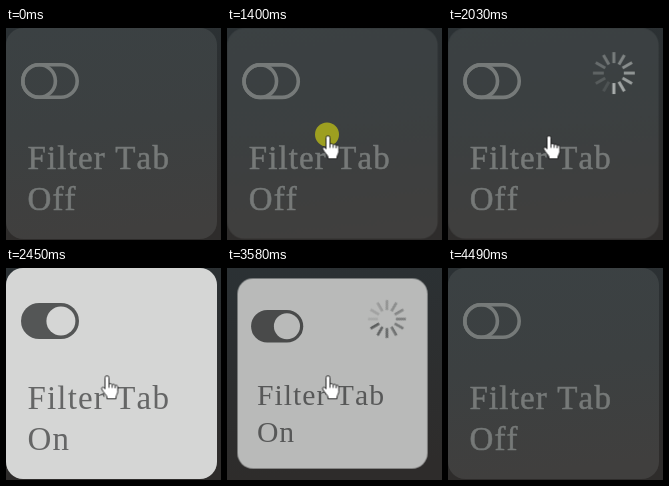
An HTML page that plays this animation: 215 px wide and 212 px high, repeating every 5280 ms.

```html
<!DOCTYPE html>
<html lang="en">
<head>
<meta charset="utf-8">
<title>Filter Tab toggle</title>
<style>
  html, body { margin: 0; width: 100%; height: 100%; overflow: hidden; background: #2c2f31; }
  svg { display: block; width: 215px; height: 212px; }
  text {
    font: 33px "Liberation Serif", "Times New Roman", serif;
    font-kerning: none;
    letter-spacing: 1.15px;
  }

  .tile, .dark, .light, .lit, .shade, .wait-dark, .wait-light, .click, .hand {
    animation: 5280ms step-end infinite;
  }
  .tile {
    transform-origin: 105.5px 105.5px;
    animation-name: bounce;
    animation-timing-function: cubic-bezier(.2, .8, .4, 1);
  }
  .dark { animation-name: dark; fill: #767978; stroke: #767a79; }
  .dark text { stroke-width: .5; }
  .light { animation-name: light; fill: #545656; }
  .light text { fill: #656666; }
  .lit { animation-name: lit; }
  .shade { animation-name: shade; animation-timing-function: linear; }
  .wait-dark { animation-name: wait-dark; stroke: #abafae; }
  .wait-light { animation-name: wait-light; stroke: #5c5e5e; }
  .spin { animation: spin 1320ms steps(12) infinite; }
  .click { animation-name: click; }
  .hand { animation-name: hand; }

  /* two presses, each a one-second bounce */
  @keyframes bounce {
    0%, 26.515%, 45.455%, 65.15%, 84.091%, 100% { transform: scale(1); }
    29.356%, 67.992% { transform: scale(.9); }
    31.25%, 69.886% { transform: scale(1); }
    32.197%, 70.833% { transform: scale(.98); }
  }
  @keyframes dark {
    0%, 77.083%, 100% { opacity: 1; }
    39.77% { opacity: 0; }
  }
  @keyframes light {
    0%, 77.083%, 100% { opacity: 0; }
    39.77% { opacity: 1; }
  }
  @keyframes lit {
    0%, 77.083%, 100% { opacity: 0; }
    39.77% { opacity: .7; }
    41.09% { opacity: 1; }
  }
  @keyframes shade {
    0%, 65.15%, 75.75%, 100% { opacity: 0; }
    67.8% { opacity: .13; }
  }
  @keyframes wait-dark {
    0%, 39.77%, 100% { opacity: 0; }
    27.84% { opacity: 1; }
  }
  @keyframes wait-light {
    0%, 77.083%, 100% { opacity: 0; }
    66.47% { opacity: 1; }
  }
  @keyframes spin { to { transform: rotate(360deg); } }
  @keyframes click {
    0%, 29.16%, 67.8%, 100% { opacity: 0; }
    26.515%, 65.15% { opacity: .5; }
  }
  @keyframes hand {
    0%, 85.03%, 100% { transform: translate(230px, 230px); }
    4.924% { transform: translate(157px, 186px); }
    6.25% { transform: translate(134px, 158px); }
    7.575% { transform: translate(112px, 130px); }
    8.9% { transform: translate(103px, 118px); }
    15.15% { transform: translate(100px, 114px); }
    16.477% { transform: translate(96px, 109px); }
    17.803% { transform: translate(94.5px, 107.3px); }
    82.386% { transform: translate(122px, 122px); }
    83.712% { transform: translate(176px, 146px); }
  }
</style>
</head>
<body>
<svg viewBox="0 0 215 212">
  <defs>
    <linearGradient id="wall" x2=".1" y2="1">
      <stop stop-color="#2b3134"/>
      <stop offset="1" stop-color="#2e2c2b"/>
    </linearGradient>
    <linearGradient id="glass" x2=".1" y2="1">
      <stop stop-color="#3b4143"/>
      <stop offset=".5" stop-color="#3c4041"/>
      <stop offset="1" stop-color="#403f3e"/>
    </linearGradient>
    <rect id="card" width="211" height="211" rx="17"/>
    <g id="bars" stroke-width="3"></g>
  </defs>

  <rect width="215" height="212" fill="url(#wall)"/>

  <g class="tile">
    <use href="#card" fill="url(#glass)"/>
    <use href="#card" class="lit" fill="#d5d6d5"/>

    <g class="dark">
      <g fill="none" stroke-width="3.6">
        <rect x="16.8" y="36.7" width="54.4" height="32.6" rx="16.3"/>
        <circle cx="33.1" cy="53" r="16.3"/>
      </g>
      <text x="21.5" y="141">Filter Tab</text>
      <text x="21.5" y="182">Off</text>
    </g>

    <g class="light">
      <rect x="15" y="34.9" width="58" height="36.2" rx="18.1"/>
      <circle cx="54.9" cy="53" r="14.5" fill="#d5d6d5"/>
      <text x="21.5" y="141">Filter Tab</text>
      <text x="21.5" y="182">On</text>
    </g>

    <use href="#card" class="shade"/>

    <g transform="translate(166 45)">
      <g class="wait-dark"><use href="#bars" class="spin"/></g>
      <g class="wait-light"><use href="#bars" class="spin"/></g>
    </g>
  </g>

  <circle class="click" cx="100" cy="106.5" r="12" fill="#ff0"/>

  <g class="hand" fill="#fff" stroke="#111" stroke-width=".9" stroke-linejoin="round">
    <path d="M4.5 2.5a2 2 0 0 1 4 0v6.5a1.9 1.9 0 0 1 3.2.6a1.8 1.8 0 0 1 3 .8a1.6 1.6 0 0 1 2.6 1.4v4.7c0 2-1.8 3.5-1.8 5.5v1.5h-9v-1.5c0-2-3.5-4.5-5.2-8c-.8-1.8 1.4-2.8 2.6-1.2l.6.8z"/>
    <path d="M8.5 9v3.5M11.7 9.6v3M14.7 10.4v2.6"/>
  </g>
</svg>
<script>
  // Twelve spokes fading back from the leading one.
  const bars = document.getElementById("bars");
  for (let i = 0; i < 12; i++) {
    const bar = document.createElementNS("http://www.w3.org/2000/svg", "path");
    bar.setAttribute("d", "M0-10V-21");
    bar.setAttribute("transform", `rotate(${-30 * i})`);
    bar.setAttribute("opacity", 1 - i * 0.075);
    bars.append(bar);
  }
</script>
</body>
</html>
```
